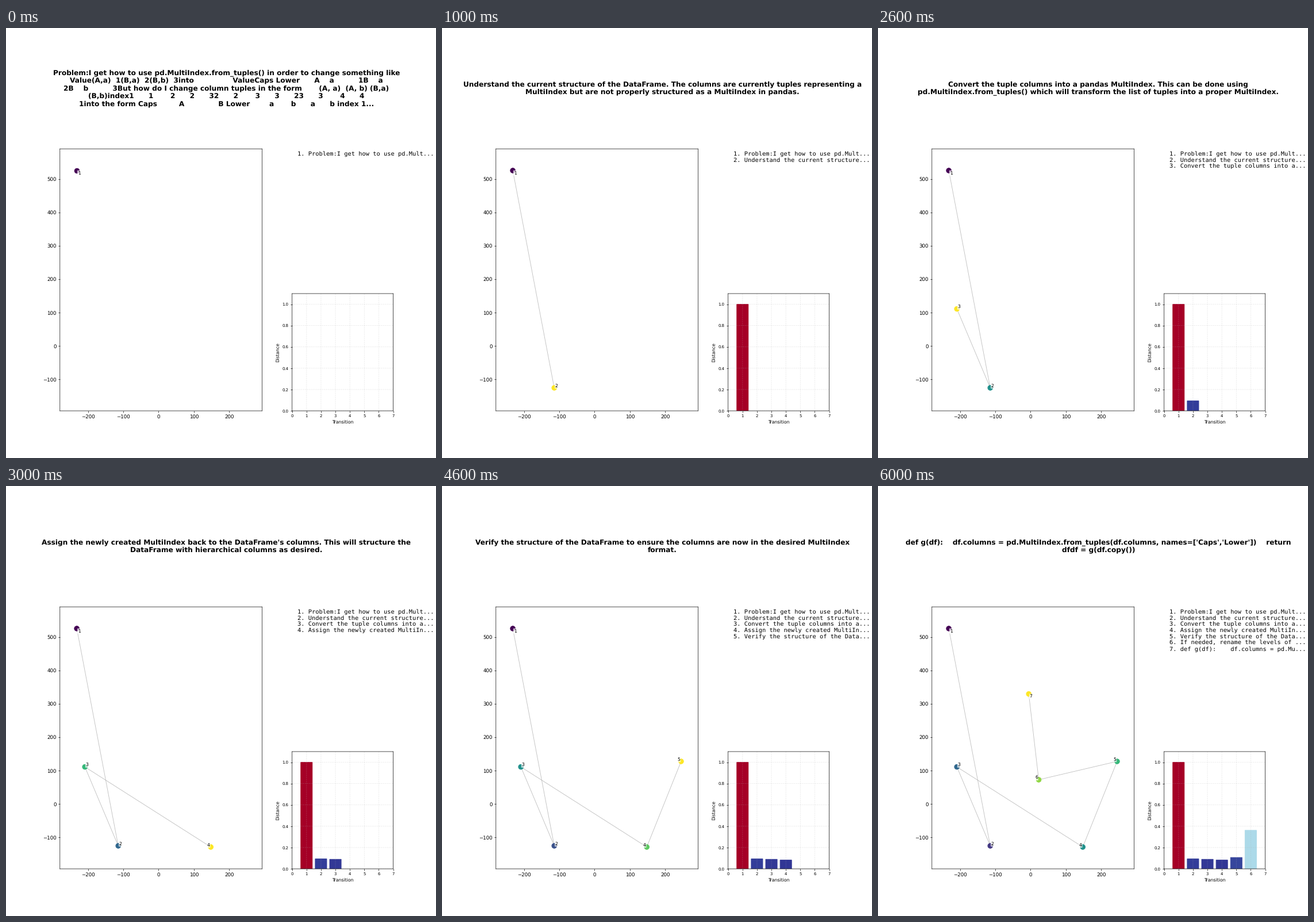
Write a matplotlib script that moves like this. It is 748 px wide and 748 px high and loops after 7 s.

```python
import matplotlib.pyplot as plt
import numpy as np
from matplotlib.animation import FuncAnimation

SIDE = 748
DPI = SIDE / 12

# Soft, unsnapped lines and letters
plt.rcParams.update({"text.hinting": "none", "path.snap": False})

STEPS = [
    "Problem:I get how to use pd.MultiIndex.from_tuples() in order to change something like\n"
    "Value(A,a)  1(B,a)  2(B,b)  3into" + " " * 16 + "ValueCaps Lower      A    a          1B    a\n"
    "2B    b          3But how do I change column tuples in the form       (A, a)  (A, b) (B,a)\n"
    "(B,b)index1      1       2      2      32      2       3      3      23      3       4      4\n"
    "1into the form Caps         A" + " " * 14 + "B Lower        a       b      a      b index 1...",
    "Understand the current structure of the DataFrame. The columns are currently tuples representing a\n"
    "MultiIndex but are not properly structured as a MultiIndex in pandas.",
    "Convert the tuple columns into a pandas MultiIndex. This can be done using\n"
    "pd.MultiIndex.from_tuples() which will transform the list of tuples into a proper MultiIndex.",
    "Assign the newly created MultiIndex back to the DataFrame's columns. This will structure the\n"
    "DataFrame with hierarchical columns as desired.",
    "Verify the structure of the DataFrame to ensure the columns are now in the desired MultiIndex\n"
    "format.",
    "If needed, rename the levels of the MultiIndex to more descriptive names such as 'Caps' and 'Lower'\n"
    "to match the example provided.",
    "def g(df):    df.columns = pd.MultiIndex.from_tuples(df.columns, names=['Caps','Lower'])    return\n"
    "dfdf = g(df.copy())",
]
POINTS = np.array([(-231.7, 525.5), (-114.3, -125.5), (-208.8, 111), (147.8, -129),
                   (245, 127.5), (23, 72.5), (-5.2, 329.5)])
# Side of each point its number sits on: (right, above)
SIDES = [(1, 0), (1, 1), (1, 1), (0, 1), (0, 1), (0, 1), (1, 0)]
DISTANCES = np.array([1.0, 0.094, 0.090, 0.083, 0.107, 0.362])


def add_axes(left, right, top, bottom):
    """Axes from edges in pixels, measured from the top left."""
    return fig.add_axes([left / SIDE, 1 - bottom / SIDE,
                         (right - left) / SIDE, (bottom - top) / SIDE])


fig = plt.figure(figsize=(12, 12), dpi=DPI)
title = fig.text(0.5125, 0.86, "", ha="center", va="center", fontsize=14, weight="bold")

# Path of steps
path_ax = add_axes(93.8, 445.4, 210.2, 666)
path_ax.set_xlim(-279.5, 293)
path_ax.set_ylim(-194.5, 590.5)
path, = path_ax.plot([], [], color="gray", alpha=0.5, lw=1)
dots = path_ax.scatter([], [], s=100, zorder=2.5)

# Distances between steps
bar_ax = add_axes(497.7, 673.5, 462, 666)
bar_ax.set_xlim(0, 7)
bar_ax.set_ylim(0, 1.1)
bar_ax.set_xticks(range(8))
bar_ax.tick_params(labelsize=8)
bar_ax.set_xlabel("Transition", fontsize=9)
bar_ax.set_ylabel("Distance", fontsize=9)
bar_ax.grid(True, linestyle="--", alpha=0.3)
spread = (DISTANCES - DISTANCES.min()) / np.ptp(DISTANCES)
colors = plt.cm.RdYlBu_r(spread)
bars = bar_ax.bar(range(1, 7), DISTANCES, width=0.8, color=colors, edgecolor=colors)


def add_number(i):
    right, above = SIDES[i]
    return path_ax.annotate(
        str(i + 1), POINTS[i], xytext=(1.5 if right else -1.5, -0.5),
        textcoords="offset pixels", fontsize=9, zorder=3,
        ha="left" if right else "right", va="bottom" if above else "top",
        bbox=dict(boxstyle="round,pad=0.1", facecolor="white", edgecolor="none", alpha=0.7))


def add_entry(i):
    short = STEPS[i].replace("\n", " ")[:32]
    return fig.text(506.7 / SIDE, 1 - (221.7 + 10.84 * i) / SIDE, f"{i + 1}. {short}...",
                    family="DejaVu Sans Mono", fontsize=12, va="baseline")


numbers = [add_number(i) for i in range(len(STEPS))]
entries = [add_entry(i) for i in range(len(STEPS))]


def update(step):
    count = step + 1
    title.set_text(STEPS[step])
    path.set_data(*POINTS[:count].T)
    dots.set_offsets(POINTS[:count])
    dots.set_color(plt.cm.viridis(np.linspace(0, 1, count)))
    for i, (number, entry) in enumerate(zip(numbers, entries)):
        number.set_visible(i < count)
        entry.set_visible(i < count)
    for i, bar in enumerate(bars):
        bar.set_visible(i < step)
    return [title, path, dots, *numbers, *entries, *bars]


anim = FuncAnimation(fig, update, frames=len(STEPS), interval=1000,
                     init_func=lambda: update(0), repeat=True, repeat_delay=0)
plt.show()
```
